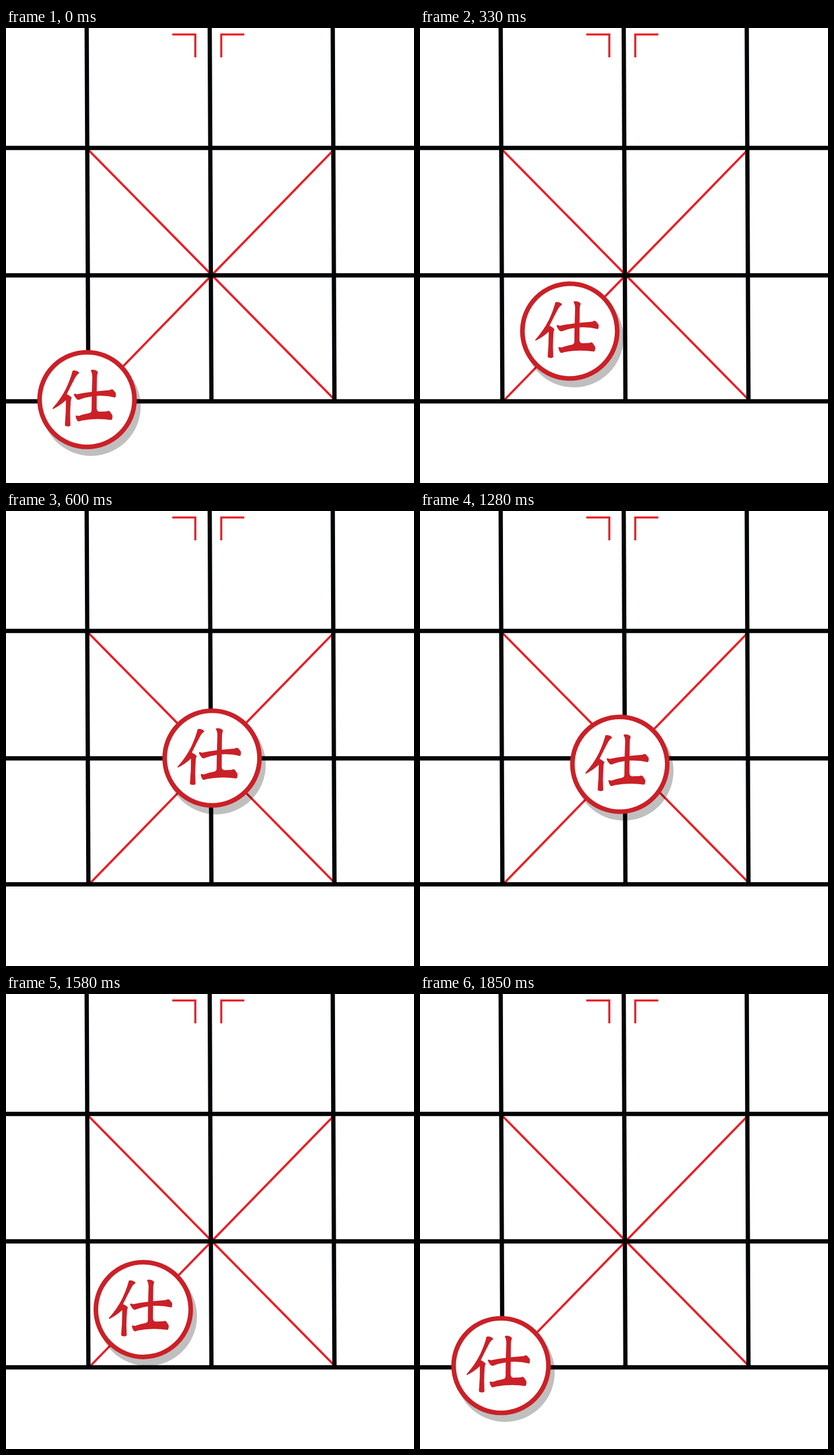
Recreate the animation shown at these times as an HTML page. Size 708x791 px, loop 2470 ms.

```html
<!DOCTYPE html>
<html lang="zh">
<head>
<meta charset="utf-8">
<title>Palace move</title>
<style>
  html, body { margin: 0; width: 100%; height: 100%; overflow: hidden; background: #fff; }
  svg { display: block; width: 100vw; height: 100vh; }
</style>
</head>
<body>
<svg viewBox="0 0 708 791">
  <defs>
    <filter id="soft" x="-10%" y="-10%" width="120%" height="120%">
      <feGaussianBlur stdDeviation="0.7"/>
    </filter>
  </defs>

  <g fill="none" stroke="#ed1c24" stroke-width="3.8">
    <path d="M143 212L569 645M568 212.5L145 648"/>
    <path d="M288.5 11.3H328.5V51M413.5 11.3H373.5V51" stroke-width="3.6"/>
  </g>
  <g fill="none" stroke="#040506" stroke-width="7.4">
    <path d="M0 208.5H708M0 430H708M0 649H708"/>
    <path d="M140 -2L143 649M353.5 -2L356.5 649M567 -2L570 649"/>
  </g>

  <!-- Piece, drawn around its own centre -->
  <g id="piece" role="img" aria-label="仕">
    <circle cx="7" cy="11.7" r="86.2" fill-opacity=".25" filter="url(#soft)"/>
    <circle r="82.3" fill="#fff" stroke="#cb2027" stroke-width="8"/>
    <g fill="#cb2027" transform="translate(-140.6 -646)">
      <path d="M115.5 596Q118 594.5 122 596Q126.5 597.5 127 600Q123 602.5 120.5 607
               Q113 621 105.5 636.5Q110 638.5 114 642.5Q112.5 645 112.3 649
               Q111.5 660 111.3 673L111.8 691Q110 693.5 106.5 692.5
               Q102.5 692.5 102.2 690Q104.2 668 104 647Q93 657 81.5 662.5
               Q80 662.5 81.5 660Q95 645 104 627Q112 610 115.5 596Z"/>
      <path d="M147 595Q150 593.3 154 594.5Q158.5 596 159.5 598.5Q157.5 603 157.8 610
               L157.5 631.5L180 629.5Q182 627.5 185.5 628.5L190.5 634.5
               Q191.5 639 189.5 642.5Q174 638.5 157.5 639.5L157.3 661
               Q157.3 666.5 162 667L175 666.5Q178 664.5 180.5 667L184.5 673
               Q185.5 678 183 681.5Q156 677.5 131 682.5Q127 684.5 124.5 683.5
               Q121.5 680 120.7 674.5Q122 673 126 674.5Q136 671 144.5 669.5
               Q148.5 668.5 148.5 664L148.8 640.5Q138 642 129 645.5
               Q125 647.5 122.5 645Q118.5 640.5 117.5 636.5Q119 634.8 123 636.7
               Q136 634 149 632.5L149.8 606Q150 600 147 595Z"/>
    </g>
  </g>
</svg>
<script>
  const LOOP = 2470, TICK = 30, STEPS = 20, BACK = 1250;
  const corner = { x: 140.6, y: 646 }, centre = { x: 357.6, y: 429.5 };
  const piece = document.getElementById('piece');

  const progress = ms => Math.max(0, Math.min(STEPS, Math.floor(ms / TICK))) / STEPS;
  const mix = (a, b, k) => a + (b - a) * k;

  function draw(now) {
    const t = now % LOOP;
    const k = progress(t) - progress(t - BACK);
    const x = mix(corner.x, centre.x, k), y = mix(corner.y, centre.y, k);
    piece.setAttribute('transform', `translate(${x} ${y})`);
  }

  function frame() {
    draw(performance.now());
    requestAnimationFrame(frame);
  }
  frame();
</script>
</body>
</html>
```
